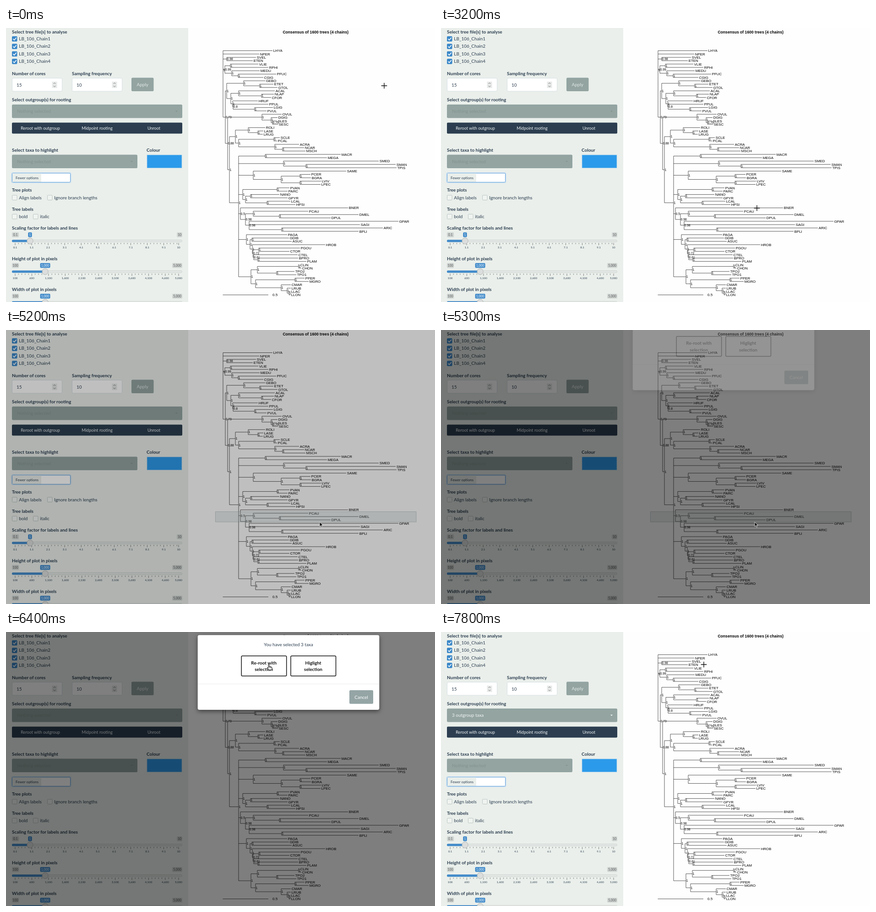
These frames come from a looping animation (937x598 px, 8 s). An HTML page:

```html
<!DOCTYPE html>
<html lang="en">
<head>
<meta charset="utf-8">
<title>Consensus tree viewer</title>
<style>
  html, body { margin: 0; width: 100%; height: 100%; overflow: hidden; background: #fefefe; }
  svg { display: block; width: 100%; height: 100%; }
  text { font-family: Lato, sans-serif; white-space: pre; }
  #tree text { font-family: "Liberation Sans", Arial, sans-serif; }
  #dialog { filter: drop-shadow(0 3px 5px rgba(0, 0, 0, .5)); }
</style>
</head>
<body>
<svg viewBox="0 0 937 598">
  <g id="tree"></g>
  <rect id="brush" x="457.5" y="396.5" width="438.5" fill="#b4c0bf" fill-opacity=".27" stroke="#6f8583" stroke-opacity=".35"/>
  <g id="panel"></g>
  <rect id="backdrop" width="937" height="598"/>
  <g id="modal"></g>
  <path id="cross" d="M-6.3 0H6.3M0-6.3V6.3" stroke="#111" stroke-width="1.4"/>
  <path id="arrow" d="M0 0v10l2.4-2.2 1.7 3.9 1.6-.7-1.7-3.8h3.3z" fill="#111" stroke="#eee" stroke-width=".8"/>
  <path id="hand" d="M0-.8q1 0 1 1v4l4.5 1q1.5.4 1.5 2v1.4l-1.2 3.2h-5l-3.8-5q.4-1.3 2-.2v-6.4q0-1 1-1zM1 4.5v2.3M3.2 5v2M5.2 5.5v1.7" fill="#fff" stroke="#111"/>
</svg>
<script>
const $ = id => document.getElementById(id);
const INK = '#2c3e50', BLUE = '#428bca', GREY = '#93a4a1', PANEL = '#eaefeb';
const FONT = 9.95;

function add(parent, tag, attrs) {
  const el = document.createElementNS('http://www.w3.org/2000/svg', tag);
  for (const key in attrs) el.setAttribute(key, attrs[key]);
  return parent.appendChild(el);
}
// y is the middle of the capitals
function label(parent, x, y, content, size = FONT, attrs = {}) {
  const el = add(parent, 'text', { x, y: y + size * .36, 'font-size': size, fill: INK, ...attrs });
  el.textContent = content;
  return el;
}
const box = (parent, x, y, width, height, fill, attrs = {}) =>
  add(parent, 'rect', { x, y, width, height, fill, ...attrs });
const line = (parent, d, stroke, width = 1) =>
  add(parent, 'path', { d, stroke, 'stroke-width': width, fill: 'none' });
const BOLD = { 'font-weight': 700 }, MIDDLE = { 'text-anchor': 'middle' };

// Tree: tips are NAME:x, inner nodes are (children)support:x with support 1 left out
function drawTree() {
  const tree = $('tree');
  const newick = '(LHYA:582,NPER:553,(SVEL:546,ETEN:539)0.98:482,' +
    '((VLIE:551,RPHI:573)490,(MEDU:554,(PFUC:590,CGIG:562)507)493)0.99:478,' +
    '(((GEBO:566,(ETET:584,GTOL:593)554)519,((ACAL:587,(NLAP:585,CFOR:579)558)508,' +
    '(HRUF:550,(PPUL:573,(LGIG:583,PVUL:569)543)0.8:496)495)491)482,' +
    '((OVUL:602,(DGIG:593,(SLES:592,SESC:594)0.75:582)579)559,' +
    '(((ROLI:566,(LASE:562,LRUG:561)550)529,((SCLE:598,PCAL:592)585,(ACRA:640,(NCAR:651,MSCH:654)604)587)508)501,' +
    '((MACR:731,MEGA:701)566,(SMED:814,(SMAN:851,TPIS:853)655)606,' +
    '(SAME:743,((PCER:665,BGRA:666)642,(LVIV:688,LPEC:687)642)601)540,' +
    '((PVAN:619,PARC:615)592,((NANO:597,GPYR:615)534,(LCAL:621,HPSI:632)570)523)517,' +
    '(BNER:747,((PCAU:660,(DMEL:770,DPUL:709)597)540,(GPAR:857,SAGI:773,(ARIC:823,BPLI:770)602)0.98:531)0.98:523)0.5:512,' +
    '(PAGA:614,((GDIB:618,ASUC:624)537,(HROB:697,((PGOU:642,CTOR:619)552,' +
    '(CTEL:637,(BPRO:638,PLAM:656)550)0.61:541)0.72:539.5)538)533)525,' +
    '(((CLIN:641,CHON:645)639,(TPO2:630,TPO1:634)591)549,((PPER:652,MGRO:661)631,' +
    '(CMAR:622,(LRUB:622,(LLAC:621,LLON:621)618)614)601)545)535)508)488)0.88:484)0.73:479)474';
  const token = /(?:([\w.]+):)?([\d.]+)/y;
  let pos = 0, tips = 0, path = '';

  function readNode() {
    const kids = [];
    if (newick[pos] === '(') {
      do { pos++; kids.push(readNode()); } while (newick[pos] === ',');
      pos++;
    }
    token.lastIndex = pos;
    const [, name, x] = token.exec(newick);
    pos = token.lastIndex;
    if (!kids.length) {
      const y = 49.5 + 7.3 * tips++;
      label(tree, +x + 1.7, y, name, 7.9, { fill: '#000' });
      return { x, y };
    }
    const y = kids.reduce((sum, kid) => sum + kid.y, 0) / kids.length;
    path += `M${x} ${kids[0].y}V${kids.at(-1).y}`;
    for (const kid of kids) path += `M${x} ${kid.y}H${kid.x}`;
    label(tree, +x + .8, y, name || '1', 6.6, { fill: '#000' });
    return { x, y };
  }
  readNode();
  line(tree, path + 'M473.5 582.5H573', '#222', .75);
  label(tree, 582, 582.5, '0.5', 8, { fill: '#000' });
  label(tree, 676.3, 8.7, 'Consensus of 1600 trees (4 chains)', 8.6, { ...BOLD, ...MIDDLE, fill: '#000' });
}

function checkbox(x, y, name, checked) {
  const panel = $('panel');
  box(panel, x + .5, y - 5, 10.5, 10.5, checked ? '#3a87c8' : '#f0f4f1', { stroke: checked ? '#3a87c8' : '#bcc6c3', rx: 1 });
  if (checked) line(panel, `M${x + 2.5} ${y + .3}l2.5 2.6 4.6-5.4`, '#fff', 1.6);
  label(panel, x + 15.3, y, name);
}

function numberInput(x, value) {
  const panel = $('panel'), s = x + 87.5;
  box(panel, x + .5, 109.5, 109, 28.5, '#fff', { stroke: '#d8e0e3', rx: 2.5 });
  label(panel, x + 10, 124, value);
  box(panel, s, 117, 11, 14, '#e8eae9');
  line(panel, `M${s + 3} 122l2.5-2.5 2.5 2.5M${s + 3} 126l2.5 2.5 2.5-2.5`, '#666', .9);
}

function picker(y, width) {
  const panel = $('panel');
  box(panel, 13, y, width, 29.5, GREY, { rx: 2.5 });
  return {
    name: label(panel, 24, y + 14.8, 'Nothing selected', FONT, { fill: '#84958f' }),
    caret: add(panel, 'path', { d: `M${width - 2} ${y + 13.5}h5l-2.5 2.7z`, fill: '#84958f' })
  };
}

function slider(y, title, min, max, step, value) {
  const panel = $('panel');
  const place = v => 20 + 357 * (v - min) / (max - min);
  const format = v => v.toLocaleString('en');
  const tag = (x, v, fill, color) => {
    const w = 5 + format(v).length * 3.4;
    const left = Math.max(13, Math.min(385 - w, x - w / 2));
    box(panel, left, y + 10, w, 10.5, fill, { rx: 2 });
    label(panel, left + w / 2, y + 15.2, format(v), 6.9, { ...MIDDLE, fill: color });
  };
  label(panel, 13, y, title, FONT, BOLD);
  tag(0, min, '#cfd5d2', '#555');
  tag(385, max, '#cfd5d2', '#555');
  tag(place(value), value, BLUE, '#fff');
  box(panel, 13.5, y + 26.5, 371, 4.5, '#e2e6e4', { stroke: '#c8cecb', 'stroke-width': .7, rx: 2 });
  box(panel, 13, y + 26.3, place(value) - 13, 5, BLUE, { rx: 2 });
  let ticks = '';
  for (let i = 0; min + step * i / 5 < max; i++)
    ticks += `M${place(min + step * i / 5)} ${y + 33}v${i % 5 ? 2.7 : 5}`;
  line(panel, ticks + `M377 ${y + 33}v5`, '#555', .7);
  for (let v = min; v < max; v += step) label(panel, place(v), y + 42.5, format(v), 6.2, MIDDLE);
  label(panel, 377, y + 42.5, format(max), 6.2, MIDDLE);
  add(panel, 'circle', { cx: place(value), cy: y + 28.7, r: 6.6, fill: '#dcdedd', stroke: '#adb2b0', 'stroke-width': .9 });
}

function drawPanel() {
  const panel = $('panel');
  const heading = (x, y, name) => label(panel, x, y, name, FONT, BOLD);
  box(panel, 0, 0, 398, 598, PANEL);
  heading(13, 8.5, 'Select tree file[s] to analyse');
  for (let i = 0; i < 4; i++) checkbox(13, 23.5 + 16.4 * i, 'LB_106_Chain' + (i + 1), true);
  heading(13, 99, 'Number of cores');
  heading(144, 99, 'Sampling frequency');
  numberInput(13, '15');
  numberInput(144, '10');
  box(panel, 274, 108.5, 48.5, 29.5, GREY, { rx: 2.5 });
  label(panel, 298.2, 123.5, 'Apply', FONT, { ...MIDDLE, fill: '#e2e8e6' });
  heading(13, 156.5, 'Select outgroup(s) for rooting');
  const outgroup = picker(167, 372);
  box(panel, 13, 206.5, 372, 24, INK, { rx: 2 });
  ['Reroot with outgroup', 'Midpoint rooting', 'Unroot'].forEach((name, i) =>
    label(panel, 75 + 124 * i, 218.5, name, 9.1, { ...MIDDLE, fill: '#f2f5f5' }));
  heading(13, 266, 'Select taxa to highlight');
  heading(307, 266, 'Colour');
  picker(276.5, 274);
  box(panel, 308, 277, 76, 28.5, '#2c9aea', { stroke: '#a9cfe9', 'stroke-width': .8 });
  box(panel, 12.5, 316, 129, 21.5, 'none', { stroke: '#c4dcf0', 'stroke-width': 2, rx: 3 });
  box(panel, 13.5, 317, 127, 19.5, '#fff', { stroke: '#6ba6dc', rx: 2 });
  box(panel, 14, 317.5, 63, 18.5, PANEL);
  label(panel, 21, 327, 'Fewer options', 8);
  heading(13, 353.5, 'Tree plots');
  checkbox(13, 370, 'Align labels');
  checkbox(90, 370, 'Ignore branch lengths');
  heading(13, 395, 'Tree labels');
  checkbox(13, 411.3, 'bold');
  checkbox(59, 411.3, 'italic');
  slider(436, 'Scaling factor for labels and lines', .1, 10, 1, 1);
  slider(503, 'Height of plot in pixels', 100, 5000, 500, 1000);
  slider(570, 'Width of plot in pixels', 100, 5000, 500, 1000);
  return outgroup;
}

function drawModal() {
  const modal = $('modal');
  box(modal, 418.5, 6.5, 397, 163.5, '#fff', { id: 'dialog', rx: 4, stroke: '#000', 'stroke-opacity': .25, 'stroke-width': .7 });
  label(modal, 617, 27, 'You have selected 3 taxa', FONT, MIDDLE);
  [['Re-root with', 563.2], ['Higlight', 671]].forEach(([name, x]) => {
    box(modal, x - 49, 52.3, 98.5, 43.7, '#fff', { stroke: '#111', 'stroke-width': 1.5, rx: 2 });
    label(modal, x, 67, name, FONT, { ...BOLD, ...MIDDLE, fill: '#111' });
    label(modal, x, 81.5, 'selection', FONT, { ...BOLD, ...MIDDLE, fill: '#111' });
  });
  line(modal, 'M419 113.3H815', '#e6e6e6', .8);
  box(modal, 750, 127, 52, 29.7, '#95a5a6', { rx: 2.5 });
  label(modal, 776, 142, 'Cancel', FONT, { ...MIDDLE, fill: '#fff' });
}

drawTree();
const outgroup = drawPanel();
drawModal();

const LOOP = 8000, TICK = 100;
// start, end, x, y reached at the end
const moves = [
  [1300, 1400, 808, 139], [1600, 1900, 767, 257], [2100, 2400, 721, 339], [2600, 2900, 692, 389],
  [3100, 3200, 690, 393], [3500, 3600, 689, 397], [4300, 4700, 685, 419], [5900, 6200, 586, 80], [6400, 6400, 574, 71]
];
const ramp = (t, start, length) => Math.max(0, Math.min(1, (t - start) / length));
const easeOut = p => 1 - (1 - p) ** 1.7;
const show = (el, on) => el.setAttribute('visibility', on ? 'visible' : 'hidden');

function cursorAt(t) {
  let x = 826, y = 126;
  for (const [start, end, toX, toY] of moves) {
    if (t < start) break;
    const p = ramp(t + TICK, start, end - start + TICK);
    x += (toX - x) * p;
    y += (toY - y) * p;
  }
  return [x, y];
}

function render(now) {
  const t = Math.floor(now % LOOP / TICK) * TICK;
  const [x, y] = cursorAt(t);
  const kind = t < 5200 || t >= 7800 ? 'cross' : t >= 6200 && t < 7600 ? 'hand' : 'arrow';
  for (const id of ['cross', 'arrow', 'hand']) {
    show($(id), id === kind);
    $(id).setAttribute('transform', `translate(${x} ${y})`);
  }

  show($('brush'), t >= 4300 && t < 7500);
  $('brush').setAttribute('height', Math.max(0, y - 396.5));

  $('backdrop').setAttribute('opacity', .5 * (ramp(t, 5125, 150) - ramp(t, 7625, 150)));
  const opacity = ramp(t, 5275, 150) - ramp(t, 7475, 150);
  const slide = 1 - easeOut(ramp(t, 5275, 300)) + easeOut(ramp(t, 7475, 300));
  $('modal').setAttribute('opacity', opacity);
  $('modal').setAttribute('transform', `translate(0 ${-44.5 * slide})`);
  show($('modal'), opacity > 0);

  const chosen = t >= 7500;
  outgroup.name.textContent = chosen ? '3 outgroup taxa' : 'Nothing selected';
  for (const el of [outgroup.name, outgroup.caret]) el.setAttribute('fill', chosen ? '#f4f7f6' : '#84958f');
  requestAnimationFrame(animate);
}

const begin = performance.now();
function animate() { render(performance.now() - begin); }
animate();
</script>
</body>
</html>
```
